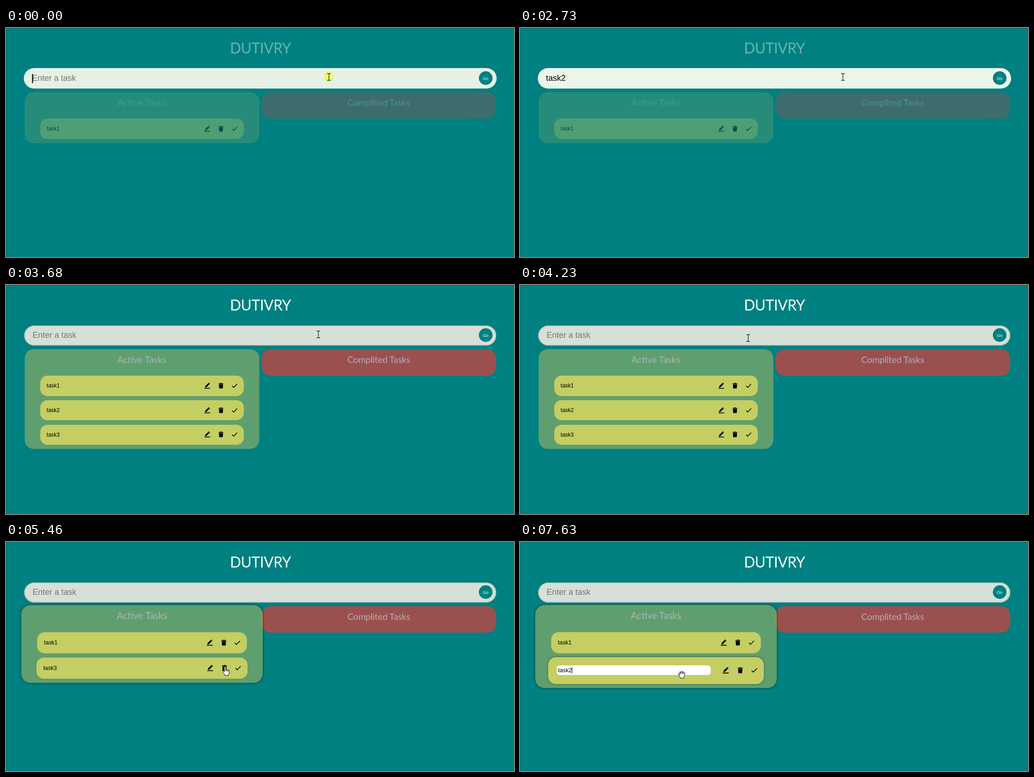
These frames come from a looping animation (1113x503 px, 8000 ms). An HTML page:

```html
<!DOCTYPE html>
<html lang="en">
<head>
<meta charset="utf-8">
<title>Task list</title>
<style>
  html, body { margin: 0; width: 100%; height: 100%; overflow: hidden; background: #008080; }
  #stage {
    position: relative; width: 1113px; height: 503px; overflow: hidden; background: #008080;
    font-family: "Liberation Sans", Arial, sans-serif; color: #000;
  }
  #stage::after {
    content: ""; position: absolute; inset: 0;
    border: solid #006c6c; border-width: 1px 0 0 1px;
  }
  #stage > * { position: absolute; }
  #page { inset: 0; isolation: isolate; }
  #page.dim { opacity: .4; }
  h1, h2 {
    position: absolute; margin: 0; width: 100%; text-align: center; white-space: nowrap;
    font-family: Lato, "Open Sans", sans-serif; font-weight: 400;
  }
  h1 { left: 1px; top: 24px; font-size: 32px; line-height: 40px; letter-spacing: -.4px; color: #fff; }
  h2 { left: 0; top: 9px; font-size: 20px; line-height: 26px; color: #aab8b5; }

  .panel {
    position: absolute; top: 141.2px; width: 514px; padding-top: 58px; border-radius: 20px;
  }
  #done { left: 559.5px; background: #9b5050; }
  #done h2 { color: #b3adb5; letter-spacing: -.3px; }
  #active { left: 40.5px; background: rgba(158, 181, 101, .6); }

  .item {
    position: relative; box-sizing: border-box; width: 446.4px; height: 44.5px;
    margin: 0 0 9.25px 34.1px; border-radius: 16px; background: #c4ce62;
    font-size: 12px; line-height: 20px;
  }
  .item.edit { height: 55.5px; }
  .label { position: absolute; left: 14.5px; top: 50%; margin-top: -10px; white-space: nowrap; }
  .edit .label {
    left: 17.5px; width: 318px; height: 20px; margin-top: -10.5px; padding-left: 3px;
    box-sizing: border-box; border-radius: 6px; background: #fff;
  }
  .item svg { position: absolute; top: 50%; margin-top: -7.7px; width: 14px; height: 14px; }

  #entry { border-radius: 23px; }
  #entry.ring { box-shadow: inset 0 0 0 2px #bccac1; }
  #field { top: 99px; height: 23px; line-height: 23px; font-size: 18px; white-space: pre; }
  .hint { color: #757575; }
  .caret { display: inline-block; width: 1.3px; height: 20px; margin-right: -1.3px; background: #000; vertical-align: middle; }
  .label .caret { height: 13px; margin-top: -2px; width: 1px; }
  #go {
    left: 1035.8px; top: 95.3px; width: 30px; height: 30px; border-radius: 50%;
    background: #008080; color: #fff; font-size: 9.5px; line-height: 31px; text-align: center;
  }
  #glow {
    left: -10.5px; top: -10.5px; width: 21px; height: 21px; border-radius: 50%;
    background: rgba(243, 248, 90, .88);
  }
  #mouse { left: 0; top: 0; width: 1px; height: 1px; overflow: visible; }
  #mouse path { stroke-linejoin: round; stroke-linecap: round; }
</style>
</head>
<body>
<svg width="0" height="0" style="position:absolute">
  <symbol id="pen" viewBox="0 0 14 14">
    <path stroke="#000" stroke-width=".4" d="M1 12.2h12v1.3H1zM2.2 10.9l.7-3 5.2-5.2 2.4 2.4-5.2 5.2zM8.7 2.1l1-1q.5-.4 1 0l1.4 1.4q.4.5 0 1l-1 1z"/>
  </symbol>
  <symbol id="bin" viewBox="0 0 14 14">
    <path d="M1.8 2h3l.5-1h3.4l.5 1h3v1.6H1.8zM2.5 4.3h9l-.5 8q-.1 1-1.1 1H4.1q-1 0-1.1-1z"/>
  </symbol>
  <symbol id="tick" viewBox="0 0 14 14">
    <path d="M1.5 7.7l3.4 3.4 7.6-7.8" fill="none" stroke="#000" stroke-width="1.5"/>
  </symbol>
</svg>

<div id="stage">
  <div id="page">
    <h1>DUTIVRY</h1>
    <div class="panel" id="done"><h2>Complited Tasks</h2></div>
    <div class="panel" id="active"><h2>Active Tasks</h2></div>
  </div>
  <div id="entry"></div>
  <div id="field"></div>
  <div id="go">Go</div>
  <div id="glow"></div>
  <svg id="mouse"><path/></svg>
</div>

<script>
const LOOP = 8000;
const $ = id => document.getElementById(id);
const mix = (a, b, p) => a + (b - a) * p;
const within = (t, a, b) => t >= a && t < b;
const CARET = '<i class="caret"></i>';

// How many of n evenly spaced steps have happened by time t.
const stepAt = (t, from, to, n) =>
  t < from ? 0 : Math.min(n, Math.floor((t - from) / ((to - from) / (n - 1)) + 1e-6) + 1);

// Value of the last [time, value] entry already reached.
const latest = (t, list) => list.reduce((v, [at, next]) => t >= at ? next : v, list[0][1]);

const typed = [[0, ''], [470, 't'], [1060, 'ta'], [1330, 'tas'], [1600, 'task'], [2130, 'task2'], [2930, '']];
const edited = [[0, 'task3'], [7290, 'task'], [7560, 'task2']];

// Pointer shapes, drawn around their hot spot.
const shapes = {
  beam: ['M-3.5-7h2.5L0-6l1-1h2.5M0-6V7M-3.5 8H-1L0 7l1 1h2.5', 'none', '#10302f', 1.3],
  arrow: ['M0 0v15l3.5-3.3 2.3 5.3 2.4-1-2.3-5.2H11z', '#fff', '#000', 1],
  point: ['M-1.6 1q0-1.6 1.6-1.6T1.6 1v6q1-1.200 2.600-.2 1.300-.8 2.300.5 2.400-.3 2.400 2v4q0 2.500-1.800 4.200v1.500H-.3v-1.500L-4.800 12q-1.200-2 .5-2.700 1.300-.2 2.700 1.700zM1.600 7v3M4.200 7v3M6.500 7.500v2.500', '#fff', '#000', 1],
  grab: ['M-3 8v-2L-7 .5q-.4-2 1.500-1.800L-3.500 1-5-4.500q.8-2.200 2.300-.7L-1.500-1.500-1.600-6.500q1.300-1.700 2.600 0L1.300-1.500 2.300-6q1.600-1.300 2.400.4L4.200-.8 5.300-3.500q1.600-1 2 .8L6.300 3 4.500 6v2z', '#fff', '#000', 1]
};

// Each path advances one point per step.
const moves = [
  { from: 3610, to: 4370, path: [
    ...Array.from({ length: 9 }, (_, i) => [mix(707.5, 500, (i + 1) / 9), mix(107, 116, (i + 1) / 9), 'beam']),
    [496, 148, 'arrow'], [491, 178, 'arrow']] },
  { from: 4450, to: 4860, path: [
    [489, 205, 'grab'], [487, 223, 'grab'], [484, 244, 'grab'],
    [482, 261, 'grab'], [480, 272, 'point'], [480, 274, 'point']] },
  { from: 6130, to: 6340, path: [
    [464, 272, 'grab'], [458, 271, 'grab'], [454, 271, 'point'], [452, 271, 'point']] },
  { from: 7160, to: 7290, path: [[354, 291, 'grab'], [354, 291, 'grab']] }
];

function mouseAt(t) {
  let spot = [707.5, 107, 'beam'];
  for (const { from, to, path } of moves) {
    const k = stepAt(t, from, to, path.length);
    if (k) spot = path[k - 1];
  }
  return spot;
}

const items = [1, 2, 3].map(n => {
  const el = document.createElement('div');
  el.className = 'item';
  el.innerHTML = `<span class="label">task${n}</span>` + ['pen', 'bin', 'tick'].map((icon, i) =>
    `<svg style="left:${359.6 + 29.9 * i}px"><use href="#${icon}"/></svg>`).join('');
  $('active').append(el);
  return el;
});

function lift(el, amount, shadow) {
  el.style.transform = amount ? `scale(${1 + .03 * amount})` : 'none';
  el.style.boxShadow = amount ? `0 0 ${shadow}px rgba(0,0,0,${.75 * amount})` : 'none';
  el.style.zIndex = amount ? 1 : 0;
}

function drawEntry(t) {
  const focus = t < 2930
    ? [.75, .9, 1][stepAt(t, 70, 140, 2)]
    : 1 - (stepAt(t, 2930, 3130, 4) - 1) / 3;
  const rgb = [[215, 236], [224, 245], [216, 233]].map(([a, b]) => Math.round(mix(a, b, focus)));
  Object.assign($('entry').style, {
    left: mix(40.3, 39, focus) + 'px', width: mix(1033.4, 1036.5, focus) + 'px',
    top: mix(88.6, 88.2, focus) + 'px', height: mix(44, 44.6, focus) + 'px',
    background: `rgb(${rgb})`
  });
  $('entry').className = t < 2930 ? '' : 'ring';

  const text = latest(t, typed);
  const caret = t < 2730 ? CARET : '';
  $('field').style.left = mix(58.3, 57, focus) + 'px';
  $('field').innerHTML = text ? text + caret : caret + '<span class="hint">Enter a task</span>';
}

function drawTasks(t) {
  $('page').className = t < 2930 ? 'dim' : '';
  items[1].style.display = within(t, 2930, 5390) ? '' : 'none';
  items[2].style.display = t >= 3610 ? '' : 'none';

  lift($('active'), [0, .5, 1][Math.max(0, stepAt(t, 3610, 4370, 11) - 9)], 4);
  const pass = stepAt(t, 4450, 4860, 6);
  lift(items[0], [0, .5, 1, .5, 0, 0, 0][pass], 3);
  lift(items[1], [0, 0, 0, .2, .6, 1, 1][pass], 3);
  lift(items[2], Math.max(0, stepAt(t, 5390, 5670, 5) - 1) / 4, 3);

  const editing = t >= 6890;
  items[2].className = editing ? 'item edit' : 'item';
  items[2].firstChild.innerHTML = latest(t, edited) + (editing ? CARET : '');
}

function drawMouse(t) {
  const [x, y, kind] = mouseAt(t);
  const [d, fill, stroke, width] = shapes[kind];
  const path = $('mouse').firstElementChild;
  Object.entries({ d, fill, stroke, 'stroke-width': width }).forEach(([k, v]) => path.setAttribute(k, v));
  $('mouse').style.transform = `translate(${x}px,${y}px)`;

  const clicked = t < 70 || within(t, 5190, 5390) || within(t, 6670, 6890);
  $('glow').style.display = clicked ? '' : 'none';
  $('glow').style.transform = t < 70 ? 'translate(706px,106.5px)' : `translate(${x}px,${y}px)`;
}

const start = performance.now();
function tick() {
  const t = (performance.now() - start) % LOOP;
  drawEntry(t);
  drawTasks(t);
  drawMouse(t);
  requestAnimationFrame(tick);
}
tick();
</script>
</body>
</html>
```
